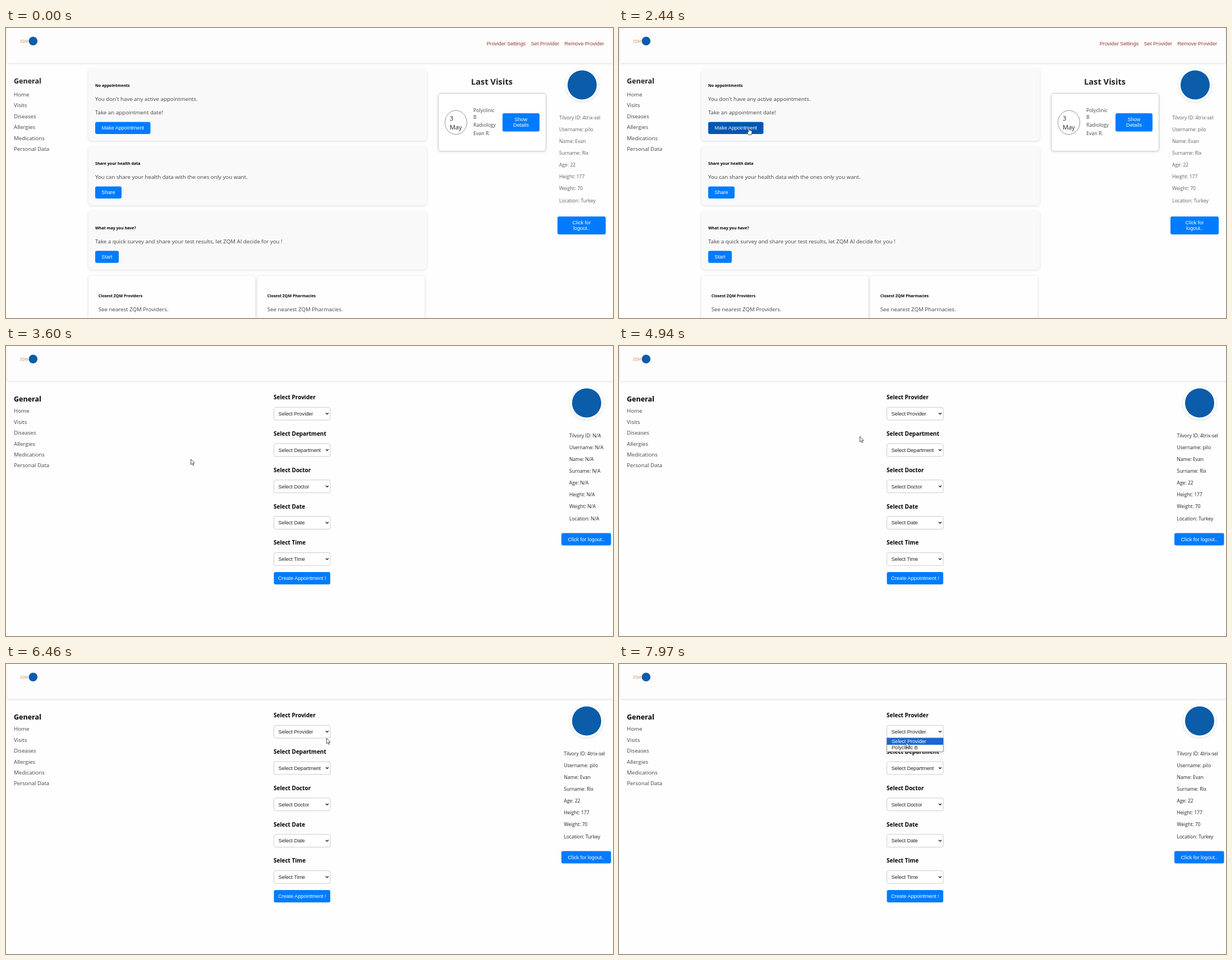
An HTML page that plays this animation: 1082 px wide and 517 px high, repeating every 8000 ms.

```html
<!DOCTYPE html>
<html lang="en">
<head>
<meta charset="utf-8">
<title>Health portal</title>
<style>
  html, body { margin: 0; width: 100%; height: 100%; overflow: hidden; background: #fefefe; }
  svg { display: block; width: 100%; height: 100%; }
  text { font-family: "Open Sans", "Noto Sans", sans-serif; font-size: 9.7px; white-space: pre; }
  .ui { font-family: "Liberation Sans", Arial, sans-serif; font-size: 9.15px; }
  .brand { font-size: 6.3px; }
  .heading { font-size: 12.5px; font-weight: 700; }
  .title { font-size: 14.7px; font-weight: 700; text-anchor: middle; }
  .caption { font-size: 7.05px; font-weight: 700; }
  .label { font-size: 10.03px; font-weight: 700; }
  .field { font-size: 8.55px; }
  .visit { font-size: 8.8px; }
  .date { font-size: 11px; }
  .middle { text-anchor: middle; }
  .end { text-anchor: end; }
  .card { filter: drop-shadow(0 1.5px 2px rgba(0, 0, 0, .13)); }
  .soft { filter: drop-shadow(0 1px 2.5px rgba(0, 0, 0, .15)); }
</style>
</head>
<body>
<svg id="stage" viewBox="0 0 1082 517"></svg>
<script>
const LOOP = 8000, PAGE_CHANGE = 2640, DATA_LOADED = 4940, LIST_OPEN = 6530, STEP = 69;
const BLUE = '#007bff', DARK_BLUE = '#0056b3', LOGO_BLUE = '#0b5ca9';
const INK = '#222', GREY = '#444';
const stage = document.getElementById('stage');

const text = (x, y, content, style = '', fill = GREY, extra = '') =>
  `<text x="${x}" y="${y}" class="${style}" fill="${fill}" ${extra}>${content}</text>`;
const rect = (x, y, w, h, r, fill, extra = '') =>
  `<rect x="${x}" y="${y}" width="${w}" height="${h}" rx="${r}" fill="${fill}" ${extra}/>`;
const circle = (x, y, r, fill, style = '') =>
  `<circle cx="${x}" cy="${y}" r="${r}" fill="${fill}" class="${style}"/>`;
const group = (id, content) => `<g id="${id}">${content}</g>`;
const column = (x, y, gap, lines, style, fill) =>
  lines.map((line, i) => text(x, y + i * gap, line, style, fill)).join('');

function button(x, y, w, h, lines, id = '') {
  const firstLine = y + h / 2 + 3 - (lines.length - 1) * 5.2;
  return rect(x, y, w, h, 3, BLUE, id && `id="${id}"`) +
    column(x + w / 2, firstLine, 10.4, lines, 'ui middle', '#fff');
}

const header = right =>
  rect(2, -6, right - 2, 68, 1, '#fdfdfd', 'class="card"') +
  text(25, 26, 'ZQM', 'brand', '#c8804f') + circle(48.3, 23.3, 7.8, LOGO_BLUE);

const sidebar = (y, titleColor) =>
  text(14, 99, 'General', 'heading', titleColor) +
  column(14, y, 19.4, ['Home', 'Visits', 'Diseases', 'Allergies', 'Medications', 'Personal Data']);

const avatar = x => circle(x, 101.5, 29.5, '#fff', 'card') + circle(x, 101.5, 26, LOGO_BLUE);

const person = {
  'Tilvory ID': '4trix-sel', Username: 'pilo', Name: 'Evan', Surname: 'Rix',
  Age: 22, Height: 177, Weight: 70, Location: 'Turkey'
};
const profile = (x, color, known) => column(x, 162.8, 21.1,
  Object.entries(person).map(([key, value]) => `${key}: ${known ? value : 'N/A'}`), 'field', color);

function infoCard(y, title, lines, action, width, id) {
  const extra = (lines.length - 1) * 24;
  return rect(147, y, 603, 104 + extra, 6, '#f9f9f9', 'class="card"') +
    text(159, y + 32.2, title, 'caption', '#000') +
    column(159, y + 57.4, 24, lines) +
    button(159, y + 70.5 + extra, width, 21.5, [action], id);
}

const placeCard = (x, w, kind) =>
  rect(x, 442, w, 90, 5, '#fefefe', 'class="soft"') +
  text(x + 17.8, 480, `Closest ZQM ${kind}`, 'caption', '#000') +
  text(x + 17.8, 505, `See nearest ZQM ${kind}.`);

const visitCard =
  text(866, 100.8, 'Last Visits', 'title', INK) +
  rect(770.5, 116.5, 192, 103, 5, '#fff', 'stroke="#ccc" class="card"') +
  '<ellipse cx="802" cy="168.3" rx="19.5" ry="21.3" fill="#fff" stroke="#777" stroke-width=".8"/>' +
  column(791, 165.3, 15.7, ['3', 'May'], 'date', INK) +
  column(833, 149.5, 12, ['Polyclinic', 'B'], 'visit') +
  column(833, 176.4, 14.6, ['Radiology', 'Evan R.'], 'visit') +
  button(885, 152, 66, 32.5, ['Show', 'Details']);

const home = header(1081) + sidebar(122, INK) +
  text(1066, 31.3, 'Provider Settings<tspan dx="9.5">Set Provider</tspan><tspan dx="9.5">Remove Provider</tspan>',
    'ui end', '#973838') +
  infoCard(73, 'No appointments',
    ["You don't have any active appointments.", 'Take an appointment date!'], 'Make Appointment', 98.5, 'make') +
  infoCard(212, 'Share your health data',
    ['You can share your health data with the ones only you want.'], 'Share', 47) +
  infoCard(326.7, 'What may you have?',
    ['Take a quick survey and share your test results, let ZQM AI decide for you !'], 'Start', 42) +
  placeCard(147, 297, 'Providers') + placeCard(448, 298, 'Pharmacies') + visitCard +
  avatar(1027) + profile(986, '#606060', true) +
  button(983, 336, 86, 32, ['Click for', 'logout..']);

function select(name, i) {
  const y = 109.3 + i * 64.8;
  return text(477, y - 14.2, `Select ${name}`, 'label', '#000') +
    rect(477.5, y, 100.5, 22.8, 3, '#fff', 'stroke="#ccc"') +
    text(485.5, y + 14.6, `Select ${name}`, 'ui', INK) +
    `<path d="M570 ${y + 10}l2.4 2.4 2.4-2.4" fill="none" stroke="#111" stroke-width="1.3"/>`;
}

const list =
  rect(477.5, 132, 100.5, 24.3, 0, '#fff', 'stroke="#777" stroke-width=".8" class="soft"') +
  rect(477.5, 132, 100.5, 12, 0, '#1967d2', 'id="highlight"') +
  text(486, 141, 'Select Provider', 'ui', '', 'id="option0"') +
  text(486, 152.3, 'Polyclinic B', 'ui', '', 'id="option1"');

const booking = header(1084) + sidebar(119.3, '#000') +
  ['Provider', 'Department', 'Doctor', 'Date', 'Time'].map(select).join('') +
  button(477.5, 403, 100.5, 22, ['Create Appointment !']) +
  avatar(1035) +
  group('empty', profile(1004, INK, false)) +
  group('filled', profile(994.5, INK, true)) +
  button(990, 333.5, 88.5, 22, ['Click for logout..']) +
  group('list', list);

const outline = 'fill="#fff" stroke="#222" stroke-width=".8"';
const pointer =
  `<path id="arrow" d="M0 0V9.6L2.2 7.6 3.8 11 5.2 10.4 3.7 7.1H6.6Z" ${outline}/>` +
  `<path id="hand" d="M-1 7V.8Q0-.6 1 .8V4.5Q3.5 3.5 4.3 5.4 5.5 5 5.5 6.4V9L4.5 12.4H-.5L-3 8.4Q-3.4 6.5-1 8Z" ${outline}/>`;

stage.innerHTML = group('home', home) + group('booking', booking) + group('cursor', pointer);

// Each stroke continues from the previous one: a straight line, or an arc pulled towards `bend`.
// `ease` above 1 slows down towards the end, below 1 speeds up.
const entry = [990, 530];
const strokes = [
  { at: 570, steps: 12, to: [414, 258] },
  { at: 1420, steps: 10, to: [227, 171], bend: [337, 215], ease: 4 },
  { at: 2300, steps: 3, to: [231.5, 178] },
  { at: 3170, steps: 9, to: [432, 167], bend: [316, 232], ease: .5 },
  { at: 4000, steps: 4, to: [428, 165] },
  { at: 4940, steps: 4, to: [434, 151] },
  { at: 5420, steps: 3, to: [573, 114] },
  { at: 5627, steps: 9, to: [572, 161], bend: [1314, 225] },
  { at: 6250, steps: 6, to: [571, 118] },
  { at: 7010, steps: 5, to: [668, 128], bend: [610, 95] },
  { at: 7355, steps: 6, to: [522, 114], bend: [545, 182] },
  { at: 7830, steps: 3, to: [512, 140] }
];

function pointerAt(t) {
  const index = strokes.findLastIndex(stroke => stroke.at <= t);
  if (index < 0) return entry;
  const { at, steps, to, bend, ease = 1 } = strokes[index];
  const from = index ? strokes[index - 1].to : entry;
  const done = Math.min(1, (Math.floor((t - at) / STEP) + 1) / steps);
  const s = 1 - (1 - done) ** ease;
  return from.map((a, i) => {
    const middle = bend ? bend[i] : (a + to[i]) / 2;
    return (1 - s) ** 2 * a + 2 * s * (1 - s) * middle + s * s * to[i];
  });
}

const el = id => document.getElementById(id);
const show = (id, on) => el(id).setAttribute('display', on ? 'inline' : 'none');
const paint = (id, fill) => el(id).setAttribute('fill', fill);

function render(t) {
  const [x, y] = pointerAt(t);
  const inside = (left, top, right, bottom) => x > left && x < right && y > top && y < bottom;
  const onHome = t < PAGE_CHANGE;
  const hover = onHome && inside(159, 168, 257.5, 189.5);
  const second = inside(478, 144, 578, 156);

  show('home', onHome);
  show('booking', !onHome);
  show('empty', t < DATA_LOADED);
  show('filled', t >= DATA_LOADED);
  show('list', t >= LIST_OPEN);
  show('hand', hover);
  show('arrow', !hover);
  paint('make', hover ? DARK_BLUE : BLUE);
  el('highlight').setAttribute('y', second ? 144 : 132);
  paint('option0', second ? INK : '#fff');
  paint('option1', second ? '#fff' : INK);
  el('cursor').setAttribute('transform', `translate(${x} ${y})`);
}

function tick() {
  render(performance.now() % LOOP);
  requestAnimationFrame(tick);
}
tick();
</script>
</body>
</html>
```
